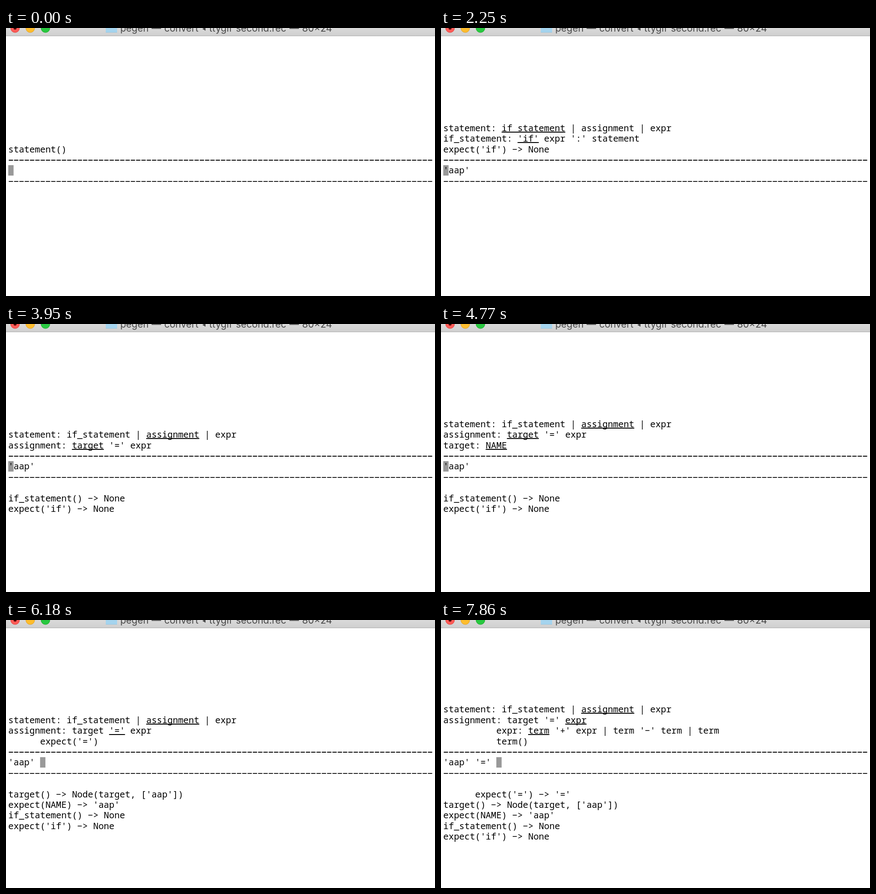
Animation of 946 by 592 pixels, one loop 8000 ms. Source, as an HTML page with a canvas:

```html
<!DOCTYPE html>
<html lang="en">
<meta charset="utf-8">
<title>Parser trace</title>
<style>
  html, body { margin: 0; width: 946px; height: 592px; overflow: hidden; background: #fff; }
  canvas { display: block; }
</style>
<canvas id="stage" width="946" height="592"></canvas>
<script>
const ctx = document.getElementById('stage').getContext('2d');
const LOOP = 8000, LEFT = 5, CELL = 11.7, ROW = 23.4, BASE = 275;

// Braces mark underlined text.
const toIf = 'statement: {if_statement} | assignment | expr';
const toAssign = 'statement: if_statement | {assignment} | expr';
const ifRule = "if_statement: {'if'} expr ':' statement";
const plain = text => text.replace(/[{}]/g, '');
const targetPart = "assignment: {target} '=' expr";
const equalsPart = "assignment: target {'='} expr";
const exprPart = "assignment: target '=' {expr}";
const exprRule = "expr: {term} '+' expr | term '-' term | term";
const noIf = "expect('if') -> None";
const noIfStatement = 'if_statement() -> None';
const gotName = "expect(NAME) -> 'aap'";
const gotTarget = "target() -> Node(target, ['aap'])";
const gotEquals = "      expect('=') -> '='";
const pad = ' '.repeat(10);

const past1 = [noIfStatement, noIf];
const past2 = [gotTarget, gotName, ...past1];
const past3 = [gotEquals, ...past2];

// Each step: start time, call stack, tokens read, cursor column, finished calls.
const steps = [
  [0, ['statement()']],
  [320, [plain(toIf)]],
  [580, [toIf]],
  [930, [toIf, 'if_statement()']],
  [1190, [toIf, plain(ifRule)]],
  [1470, [toIf, ifRule]],
  [1760, [toIf, ifRule, "expect('if')"]],
  [2250, [toIf, ifRule, noIf], "'aap'"],
  [2530, [toIf, plain(ifRule), noIf], "'aap'"],
  [2820, [toIf, noIfStatement, noIf], "'aap'"],
  [3090, [toAssign, noIfStatement, noIf], "'aap'"],
  [3350, [toAssign, 'assignment()'], "'aap'", 0, past1],
  [3640, [toAssign, plain(targetPart)], "'aap'", 0, past1],
  [3950, [toAssign, targetPart], "'aap'", 0, past1],
  [4200, [toAssign, targetPart, 'target()'], "'aap'", 0, past1],
  [4500, [toAssign, targetPart, 'target: NAME'], "'aap'", 0, past1],
  [4770, [toAssign, targetPart, 'target: {NAME}'], "'aap'", 0, past1],
  [5030, [toAssign, targetPart, 'target: {NAME}', 'expect(NAME)'], "'aap'", 0, past1],
  [5300, [toAssign, targetPart, 'target: {NAME}', gotName], "'aap'", 6, past1],
  [5580, [toAssign, targetPart, gotTarget, gotName], "'aap'", 6, past1],
  [5900, [toAssign, equalsPart, gotTarget, gotName], "'aap'", 6, past1],
  [6180, [toAssign, equalsPart, "      expect('=')"], "'aap'", 6, past2],
  [6480, [toAssign, equalsPart, gotEquals], "'aap' '='", 10, past2],
  [6780, [toAssign, exprPart, gotEquals], "'aap' '='", 10, past2],
  [7030, [toAssign, exprPart, pad + 'expr()'], "'aap' '='", 10, past3],
  [7300, [toAssign, exprPart, pad + plain(exprRule)], "'aap' '='", 10, past3],
  [7580, [toAssign, exprPart, pad + exprRule], "'aap' '='", 10, past3],
  [7860, [toAssign, exprPart, pad + exprRule, pad + 'term()'], "'aap' '='", 10, past3]
];

function rect(color, x, y, w, h) {
  ctx.fillStyle = color;
  ctx.fillRect(x, y, w, h);
}

function disc(color, x, y, r, edge) {
  ctx.beginPath();
  ctx.arc(x, y, r, 0, 2 * Math.PI);
  ctx.fillStyle = color;
  ctx.fill();
  if (edge) {
    ctx.strokeStyle = edge;
    ctx.lineWidth = 1;
    ctx.stroke();
  }
}

function titleBar() {
  const shade = ctx.createLinearGradient(0, 0, 0, 17);
  shade.addColorStop(0, '#dadada');
  shade.addColorStop(1, '#cfcfcf');
  rect(shade, 0, 0, 946, 17);
  rect('#acacac', 0, 17, 946, 1);

  disc('#fc5b57', 20, 0.3, 9.7, '#e2443f');
  disc('#4d0000', 20, 0.3, 3.3);
  disc('#fdbd2e', 53.5, 0.3, 9.7, '#e0a028');
  disc('#28c840', 87, 0.3, 9.7, '#1dac2c');
  rect('#a5d4ee', 220, 0, 25, 10);
  rect('#92c5e2', 220, 9, 25, 1);

  ctx.font = '21px Inter, sans-serif';
  ctx.fillStyle = '#484848';
  const words = [['pegen', 252], ['—', 321], ['convert', 349], ['ttygif', 448],
    ['second.rec', 507], ['—', 625], ['80×24', 653]];
  for (const [word, x] of words) ctx.fillText(word, x, 8);
  ctx.beginPath();
  ctx.moveTo(433, 2);
  ctx.lineTo(440, -2);
  ctx.lineTo(440, 6);
  ctx.fill();
}

function rule(y) {
  ctx.strokeStyle = '#000';
  ctx.lineWidth = 1.8;
  ctx.setLineDash([9.4, CELL - 9.4]);
  ctx.beginPath();
  ctx.moveTo(LEFT + 1.1, y);
  ctx.lineTo(LEFT + 80 * CELL, y);
  ctx.stroke();
  ctx.setLineDash([]);
}

function line(text, row) {
  const y = Math.floor(BASE + ROW * row);
  let x = LEFT, start = 0;
  ctx.fillStyle = '#000';
  for (const char of text) {
    if (char === '{') start = x;
    else if (char === '}') ctx.fillRect(start, y + 1, x - start, 2);
    else {
      ctx.fillText(char === '-' ? '−' : char, x, y);
      x += CELL;
    }
  }
}

function draw() {
  const time = performance.now() % LOOP;
  const [, stack, tokens = '', cursor = 0, past = []] = steps.findLast(step => step[0] <= time);

  rect('#fff', 0, 0, 946, 592);
  titleBar();
  rule(292);
  rule(338.8);
  rect('#999', LEFT + cursor * CELL, 303, CELL, 23);

  ctx.font = '19.5px "Noto Sans Mono", monospace';
  stack.forEach((text, i) => line(text, i + 1 - stack.length));
  line(tokens, 2);
  past.forEach((text, i) => line(text, i + 5));
  requestAnimationFrame(draw);
}
draw();
</script>
</html>
```
